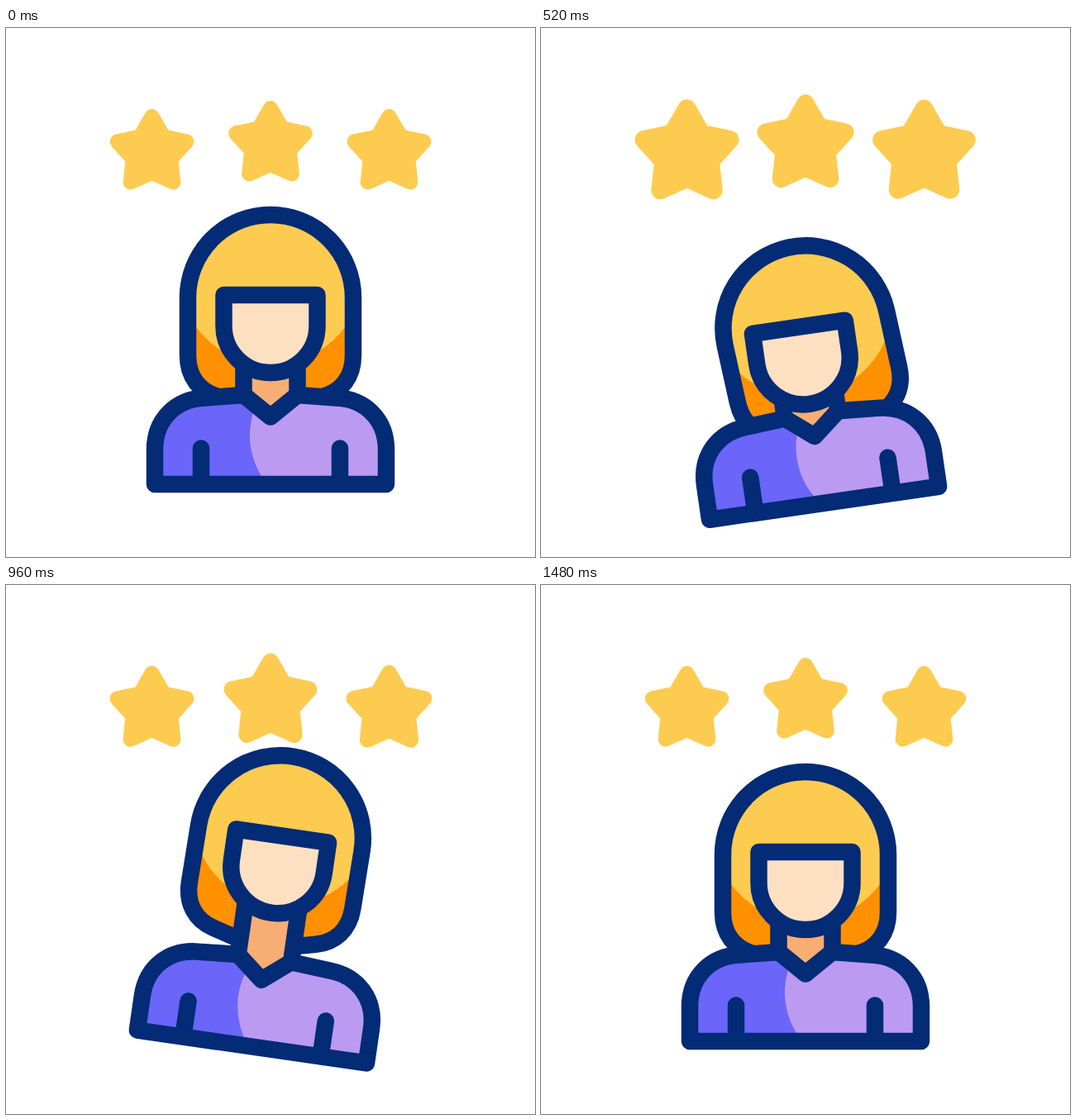
Write an HTML page that moves like this. It is 640 by 640 pixels and loops after 1720 ms.

```html
<!DOCTYPE html>
<html lang="en">
<head>
<meta charset="utf-8">
<title>Three star customer</title>
<style>
  html, body { margin: 0; height: 100%; overflow: hidden; background: #fff; }
  svg { display: block; width: 100%; height: 100%; }
  .line { stroke: #032b76; stroke-width: 20.5; stroke-linecap: round; stroke-linejoin: round; }
  .star { fill: #fdcb50; stroke: #fdcb50; stroke-width: 18; stroke-linejoin: round; }
</style>
</head>
<body>
<svg viewBox="0 0 640 640">
  <g id="stars"></g>
  <g id="person" fill="none">
    <g id="hair">
      <path fill="#ff9100" d="M220 326V396C220 422 234 440 257 446L284 453H356L383 446C406 440 420 422 420 396V326A100 100 0 0 0 220 326Z"/>
      <path fill="#fdcb50" d="M220 345.6A111.8 111.8 0 0 0 420 345.6V326A100 100 0 0 0 220 326Z"/>
      <path class="line" d="M220 326V396C220 422 234 440 257 446L284 453H356L383 446C406 440 420 422 420 396V326A100 100 0 0 0 220 326Z"/>
    </g>
    <path class="line" fill="#f8ae73" d="M287.5 375V444L320 470.5L352.5 444V375"/>
    <path fill="#6b65fa" d="M180 552V510C180 474 205 449 240 447.5L287.5 444L320 470.5V552Z"/>
    <path fill="#bb9af2" d="M303.6 454A93 93 0 0 0 316 552H460V510C460 474 435 449 400 447.5L352.5 444L320 470.5Z"/>
    <path class="line" d="M180 552V510C180 474 205 449 240 447.5L287.5 444L320 470.5L352.5 444L400 447.5C435 449 460 474 460 510V552ZM236 508.5V552M404 508.5V552"/>
    <path id="face" class="line" fill="#fde0c1" d="M263.5 323H376.5V360.5A56.5 56.5 0 0 1 263.5 360.5Z"/>
  </g>
</svg>
<script>
const LOOP = 1720, STEP = 40;
const $ = id => document.getElementById(id);

// Each track is a list of [ms, value] keys, eased in and out.
const lean = [[40, 0], [330, -8.4], [500, -8.4], [820, 8.2], [1020, 8.2], [1280, 0]];
const sink = [[40, 0], [440, 25], [1280, 0]];
const nod = [[160, 0], [560, 14.2], [605, 14.2], [960, -28.6], [1460, 0]];
const swing = [[100, 0], [480, -4.3], [520, -4.3], [860, 1], [960, 1], [1200, 0]];
const stars = [
  { x: 176.5, y: 151, grow: [[50, 1], [470, 1.245], [1000, 1]] },
  { x: 320, y: 141, grow: [[300, 1], [680, 1.25], [1200, 1]] },
  { x: 463.5, y: 151, grow: [[130, 1], [610, 1.25], [1040, 1]] }
];

function valueAt(keys, t) {
  const next = keys.findIndex(([time]) => time > t);
  if (next === 0) return keys[0][1];
  if (next < 0) return keys[keys.length - 1][1];
  const [t0, a] = keys[next - 1], [t1, b] = keys[next];
  const u = (t - t0) / (t1 - t0);
  return a + (b - a) * u * u * (3 - 2 * u);
}

const starPoints = Array.from({ length: 10 }, (_, i) => {
  const r = i % 2 ? 24 : 44, angle = i * Math.PI / 5;
  return [r * Math.sin(angle), -r * Math.cos(angle)];
}).join(" ");

for (const star of stars) {
  star.node = document.createElementNS("http://www.w3.org/2000/svg", "polygon");
  star.node.setAttribute("points", starPoints);
  star.node.setAttribute("class", "star");
  $("stars").append(star.node);
}

function draw(t) {
  const move = (node, transform) => node.setAttribute("transform", transform);
  const drop = `translate(0 ${valueAt(nod, t)})`;
  move($("person"), `translate(0 ${valueAt(sink, t)}) rotate(${valueAt(lean, t)} 320 394)`);
  move($("face"), drop);
  move($("hair"), `${drop} rotate(${valueAt(swing, t)} 320 216)`);
  for (const { node, x, y, grow } of stars) {
    move(node, `translate(${x} ${y - 4}) scale(${valueAt(grow, t)}) translate(0 4)`);
  }
}

function tick() {
  const t = performance.now() % LOOP;
  draw(Math.floor(t / STEP) * STEP);
  requestAnimationFrame(tick);
}
tick();
</script>
</body>
</html>
```
